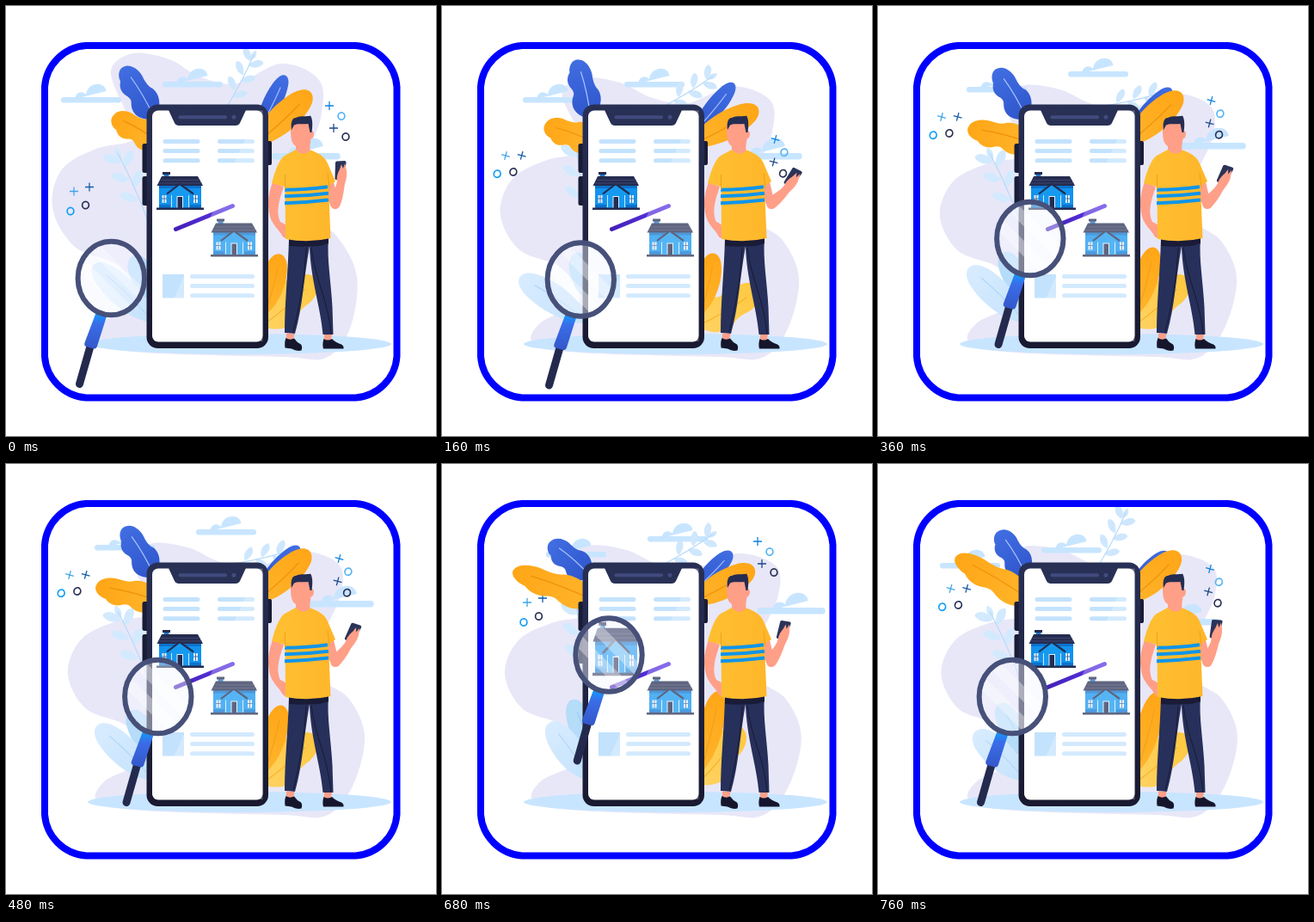
An HTML page for the animation above (0.8 s loop, 500 px wide and 500 px high).

```html
<!DOCTYPE html>
<html lang="en">
<head>
<meta charset="utf-8">
<title>House search</title>
<style>
  html, body { margin: 0; width: 100%; height: 100%; overflow: hidden; background: #fff; }
  svg { display: block; width: 100vw; height: 100vh; }
</style>
</head>
<body>
<svg viewBox="0 0 500 500">
  <defs>
    <linearGradient id="royal"><stop stop-color="#2f55cb"/><stop offset="1" stop-color="#416ee2"/></linearGradient>
    <linearGradient id="amber"><stop stop-color="#ffb52c"/><stop offset="1" stop-color="#ffa616"/></linearGradient>
    <linearGradient id="gold"><stop stop-color="#ffd262"/><stop offset="1" stop-color="#ffc840"/></linearGradient>
    <linearGradient id="pale"><stop stop-color="#c4e2fc"/><stop offset="1" stop-color="#d8ecff"/></linearGradient>
    <linearGradient id="shirt"><stop stop-color="#ffc032"/><stop offset="1" stop-color="#ffb62a"/></linearGradient>
    <linearGradient id="case" x2="0" y2="1"><stop stop-color="#283055"/><stop offset="1" stop-color="#191930"/></linearGradient>
    <linearGradient id="bar" gradientUnits="userSpaceOnUse" x1="197" x2="264" y1="0" y2="0"><stop stop-color="#4420b8"/><stop offset="1" stop-color="#5a35e6"/></linearGradient>
    <linearGradient id="grip" x2="0" y2="1"><stop stop-color="#0f9cff"/><stop offset=".3" stop-color="#3a6de8"/><stop offset="1" stop-color="#3457c9"/></linearGradient>
    <clipPath id="glass"><ellipse cx="122.300" cy="316.500" rx="38" ry="42"/></clipPath>

    <g id="cloud">
      <rect y="15" width="70" height="6.500" rx="3.250"/>
      <path d="M16 17Q18 8 25 9.500 28 10 29 12C31-3 51-4 52.500 8 60 6 63 17Z"/>
    </g>
    <path id="plus" d="M0-5V5M-5 0H5" stroke-width="1.300"/>
    <ellipse id="ring" rx="3.900" ry="4.200" stroke-width="1.700"/>

    <g id="house">
      <path fill="#1193ee" d="M178 208H227V235H178Z"/>
      <path fill="#0b72cc" d="M178 208H227V212H178ZM178 231H227V235H178Z"/>
      <path fill="#1876d0" d="M183.500 195H189.500V208H183.500Z"/>
      <path fill="#252c50" d="M182 193H191V196H182ZM181 198H223L229 209H175.500Z"/>
      <path stroke="#48507a" stroke-width=".7" d="M180 202.500H226M178 206H228"/>
      <path fill="#169aef" d="M191 217 202 208 214 217V235H191Z"/>
      <path fill="none" stroke="#252c50" stroke-width="2.200" d="M187 218.500 202 207 218 218.500"/>
      <path fill="#e3f1ff" d="M181.500 220H186.500V229H181.500ZM218 220H223V229H218ZM198.500 221H206V235H198.500Z"/>
      <path fill="#252c50" d="M199.500 222H205V235H199.500Z"/>
      <path stroke="#2b5d9c" stroke-width=".8" d="M184 220V229M181 224H187M220.500 220V229M217.500 224H223.500"/>
      <path stroke="#cfe6fb" d="M192.500 220V234M212.500 220V234"/>
      <path fill="#252c50" d="M175 234.500H230V237H175Z"/>
    </g>
  </defs>

  <path id="blob" fill="#e8e7f8"/>
  <ellipse cx="271.500" cy="393" rx="176.500" ry="12" fill="#c8e5ff"/>
  <g id="clouds" fill="#c8e5ff">
    <use href="#cloud" x="64" y="91"/>
    <use href="#cloud" x="182" y="73"/>
    <use href="#cloud" transform="translate(309 154) scale(1.140)"/>
  </g>
  <g id="sparkL" fill="none" stroke="#2a3156">
    <use href="#plus" stroke="#3fa5ea"/>
    <use href="#plus" x="18" y="-5" stroke="#155ca8"/>
    <use href="#ring" x="-4" y="23" stroke="#129ff5"/>
    <use href="#ring" x="13.500" y="16"/>
  </g>
  <g id="sparkR" fill="none" stroke="#2a3156">
    <use href="#plus" stroke="#0e83dd"/>
    <use href="#plus" x="5" y="26" stroke="#1c4a8c"/>
    <use href="#ring" x="14" y="12" stroke="#58b5f3"/>
    <use href="#ring" x="19" y="36"/>
  </g>
  <g id="plants"></g>

  <g id="phone">
    <path fill="#191c36" d="M158.500 162Q158.500 160 161 160H165V194H161Q158.500 194 158.500 192ZM158.500 200Q158.500 198 161 198H165V232H161Q158.500 232 158.500 230ZM304 157H307Q309 157 309 159V183Q309 185 307 185H304Z"/>
    <rect x="163.500" y="114.500" width="141.500" height="283.500" rx="13" fill="url(#case)"/>
    <rect x="170" y="121.500" width="128.500" height="269" rx="7" fill="#fff"/>
    <path fill="#283055" d="M189 121H279L272.500 135Q271 139 267 139H201Q197 139 195.500 135Z"/>
    <path stroke="#424b7e" stroke-width="4" stroke-linecap="round" d="M202.500 129.300H255"/>
    <circle cx="265" cy="129.300" r="2.500" fill="#424b7e"/>
    <g id="lines" fill="none" stroke="#c3e2fd" stroke-width="5" stroke-linecap="round"></g>
    <path fill="#c3e2fd" d="M182 312H207V339.500H182Z"/>
    <use id="home" href="#house"/>
    <use href="#house" x="63" y="54.500"/>
    <path stroke="url(#bar)" stroke-width="5" stroke-linecap="round" d="M197.500 259.500 263.500 232.500"/>
    <path fill="#fff" fill-opacity=".27" d="M293 121.500H298.500V390H173Z"/>
  </g>

  <g id="man">
    <path fill="none" stroke="#ff9f88" stroke-width="11" stroke-linejoin="round" d="M375 203 380 224 384 231"/>
    <g id="arm">
      <path fill="#ff9f88" d="M377 225C379 218 384 212 385 203L394 205C393 216 391 226 388 233 385 238 378 237 376.500 230Z"/>
      <path fill="#2b3358" d="M384.500 180.500 394 180Q396 180.500 395.500 182.500L393 200.500Q392.500 202.500 390.500 202.500L383.500 202Q382 201.500 382.500 199.500L383 182Q383.500 180.500 384.500 180.500Z"/>
      <path fill="#ff9f88" d="M385 205C384 198 386 194 388 190L390 184 392 189 394 183 395.500 189C397 194 396 202 393.500 208Z"/>
    </g>
    <path fill="#ff9f88" d="M310 205C304 220 303 236 309 250 314 259 319 262 321 267 324 272 331 271 331 263 328 255 323 253 319 251 313 238 319 222 323 210Z"/>
    <path fill="#27305a" d="M329 271H375C373 295 378 320 379.500 350L380.500 382 368.500 382C366 350 354 318 353 279 346 318 345 350 336 381L324 380C324 345 328 310 329 271Z"/>
    <path fill="#191b37" d="M329 270H375V276Q365 280 352 279.500 340 280 329 279Z"/>
    <path fill="none" stroke="#171a35" d="M349 281C347 320 341 350 334 379M355 281C360 320 374 340 378 381"/>
    <path fill="#ff9f88" d="M326 380.500 335.500 381 334 389H326ZM370 382H379L377.500 389H370Z"/>
    <path fill="#15162c" d="M325.500 386Q330 389 335 386.500 338 391 343 393.500 345 396 343.500 400.500 338 402 332 398.500L324.500 397.500Q323.500 391 325.500 386ZM369.500 387Q374 390 379 387 383 391 390 393.500 393 395 392.500 398.500H369Q367.500 393 369.500 387Z"/>
    <path fill="url(#shirt)" d="M337 167Q345 172 354 167.500C363 171 371 175 374 183L383 204 375 209.500 377.500 270Q352 276 325 271L324.500 210 309 206C313 190 318 178 324 174Z"/>
    <path fill="none" stroke="#0f95ea" stroke-width="4" d="M324 213.800Q350 213.500 374 210.300M324 221.300Q350 221 375 217.800M324 229.300Q350 228.500 375 225.600"/>
    <path fill="none" stroke="#eda11c" d="M324.500 196V214M374 194 376 212"/>
    <path fill="#ff9f88" d="M331 142C331 136 336 133 342 133H355V145Q358 145 358 149 357.500 154 354.500 154.500C354 160 353 162 353.500 168Q345 176 337 167V163C331 160 331 150 331 142Z"/>
    <path fill="#262d52" d="M332 144C331 137 332 130 337 130 343 127 350 129 354 127.500 357 132 356.500 140 355.500 147H353.500L351.500 137C345 138 339 136 335 138.500Z"/>
  </g>

  <g id="lens">
    <path stroke="#242a4e" stroke-width="9" stroke-linecap="round" d="M98.500 394 85.500 439.500"/>
    <path fill="url(#grip)" d="M104.500 357 117 361 106 395.500Q105 399 102 398.500L93 396Q90.500 395 91.500 391.500Z"/>
    <g clip-path="url(#glass)">
      <path fill="#f3f5ff" fill-opacity=".45" d="M80 270H165V362H80Z"/>
      <path stroke="#fff" stroke-opacity=".35" stroke-width="13" d="M78 291 152 365M100 278 170 348"/>
    </g>
    <ellipse cx="122.300" cy="316.500" rx="38.700" ry="42.800" fill="none" stroke="#465079" stroke-width="6"/>
  </g>
  <path fill="none" stroke="#00f" stroke-width="8" d="M93 46H406.500A52 52 0 0 1 454.500 94V407.500A52 52 0 0 1 406.500 455.500H93A52 52 0 0 1 45 407.500V94A52 52 0 0 1 93 46Z"/>
</svg>
<script>
const LOOP = 800, FIRST = 160, HOLD = 200;
const $ = id => document.getElementById(id);
const place = (id, value) => $(id).setAttribute('transform', value);
const points = text => text.split(' ').map(pair => pair.split(',').map(Number));

// Text lines on the screen: two short columns, then one wide block.
const rows = (x1, x2, y) => [0, 1, 2].map(i => `<path d="M${x1} ${y + i * 11.1}H${x2}"/>`).join('');
$('lines').innerHTML = rows(185, 223, 157.5) + rows(248.5, 286.5, 157.5) + rows(216.5, 286.5, 314.5);

// Stops visited by the parts that jump around.
const stops = {
  clouds: points('0,0 30,0 39,-12 57,-4 8,9'),
  lens: points('0,0 39,1.5 54.5,-46 71.7,-94.5 34,-46'),
  sparkL: points('79,215.5 74,174 74,129 99,161 84.5,145'),
  sparkR: points('376,116 387.5,155 387.5,110 367,90 386,122')
};

const outline = points('122,76 148,55 190,62 225,82 268,90 320,67 364,86 366,130 345,190 350,240 385,268 408,315 400,375 372,409 320,408 160,403 106,392 112,368 155,342 130,302 80,280 54,235 65,190 105,166 148,155 140,125');

// Closed smooth curve through points.
function smooth(p) {
  const at = i => p[(i + p.length) % p.length];
  const handle = (i, k) => at(i).map((v, n) => v + k * (at(i + 1)[n] - at(i - 1)[n]) / 6);
  return 'M' + p[0] + p.map((_, i) => `C${handle(i, 1)} ${handle(i + 1, -1)} ${at(i + 1)}`).join('') + 'Z';
}

// The top of the blob sinks and leans right, its foot stays.
function lean([x, y], sway) {
  const h = Math.max(0, (400 - y) / 340);
  return [x + 28 * sway * Math.min(1, 1.6 * h), y + 44 * sway * h * h];
}

// Rhythms shared by all parts, by step number.
const beats = {
  swing: k => Math.sin(k * Math.PI / 2),
  flip: k => Math.cos(k * Math.PI),
  wave: k => Math.sin((72 * k - 54) * Math.PI / 180),
  sway: k => 0.9 * (1 - Math.exp(-1.2 * k)),
  nod: k => Math.abs(Math.sin(k * Math.PI / 2))
};
const grow = k => Math.min(1, Math.max(0, k / 1.5 - 1));

// Unit shapes growing along x.
const sprig = [20, 30, 48, 58, 76, 84].map((x, i) => {
  const s = i % 2 ? -1 : 1;
  return `M${x} 0C${x - 2} ${s * 25} ${x + 6} ${s * 48} ${x + 15} ${s * 50}C${x + 20} ${s * 30} ${x + 12} ${s * 8} ${x} 0Z`;
}).join('');
const SHAPES = {
  oval: 'M0 0C15-40 50-60 82-43C106-28 104 14 88 30C60 58 18 42 0 0Z',
  wavy: 'M0 0C5-32 18-58 34-50C44-44 44-34 54-42C66-58 76-50 82-38C92-38 104-20 100 2C98 22 85 36 72 36C60 34 52 36 45 45C30 58 10 40 0 0Z',
  sprig: sprig + 'M86 0Q95-20 104 0Q95 20 86 0Z'
};
const plants = [];

// Angles are in degrees from straight up; the beat turns the plant by `turn`.
function plant(shape, fill, vein, x, y, size, width, angle, beat, turn, extra = 0) {
  const g = document.createElementNS('http://www.w3.org/2000/svg', 'g');
  g.innerHTML = `<path d="${SHAPES[shape]}" fill="${fill}"/>` +
    `<path d="M0 0Q45 8 ${shape === 'sprig' ? 96 : 80} 0" fill="none" stroke="${vein}" vector-effect="non-scaling-stroke" stroke-width="1.2"/>`;
  $('plants').append(g);
  plants.push(k => g.setAttribute('transform',
    `translate(${x} ${y}) rotate(${angle - 90 + turn * beats[beat](k)}) scale(${(size + extra * grow(k)) / 100} ${width / 100})`));
}

plant('sprig', '#cfe7fd', '#b5dafa', 257, 117, 71, 29, 50, 'wave', 28);
plant('sprig', '#d3eafe', '#b5dafa', 165, 250, 90, 36, -24, 'nod', 18);
plant('oval', '#b5dcf8', '#9bcdf2', 176, 346, 62, 31, -22, 'flip', -4, 14);
plant('oval', 'url(#pale)', '#b3d8f8', 172, 368, 97, 36, -45, 'swing', -11, -15);
plant('wavy', 'url(#gold)', '#f5b52e', 297, 372, 83, 43, 50, 'swing', 10);
plant('oval', 'url(#amber)', '#f3a01c', 300, 360, 74, 30, 15, 'flip', 1, 24);
plant('wavy', 'url(#royal)', '#a9c4ff', 173, 131, 70, 34, -30, 'swing', 18, -8);
plant('wavy', 'url(#amber)', '#ee900c', 180, 160, 64, 35, -66, 'wave', -9, 39);
plant('oval', 'url(#royal)', '#9dbcff', 292, 148, 75, 23, 27, 'sway', 21, -11);
plant('oval', 'url(#amber)', '#ee900c', 287, 163, 92, 35, 55, 'flip', -7, -5);

function pose(k) {
  for (const id in stops) {
    const turn = id.startsWith('spark') && k % 3 ? 15 : 0;
    place(id, `translate(${stops[id][k]}) rotate(${turn})`);
  }
  $('blob').setAttribute('d', smooth(outline.map(p => lean(p, beats.sway(k)))));
  plants.forEach(turn => turn(k));
  place('arm', `rotate(${30 * k * Math.exp(1 - k)} 383 231)`);

  // The house stretches as the glass centres on it.
  const [dx, dy] = stops.lens[k];
  const near = Math.max(0, 1 - Math.hypot(122 + dx - 202, 316 + dy - 215) / 45);
  place('home', `translate(0 215) scale(1 ${1 + 0.55 * near}) translate(0 -215)`);
}

let shown = -1;
const start = performance.now();
function tick() {
  const t = (performance.now() - start) % LOOP;
  const k = Math.floor((t + HOLD - FIRST) / HOLD);
  if (k !== shown) pose(shown = k);
  requestAnimationFrame(tick);
}
tick();
</script>
</body>
</html>
```
